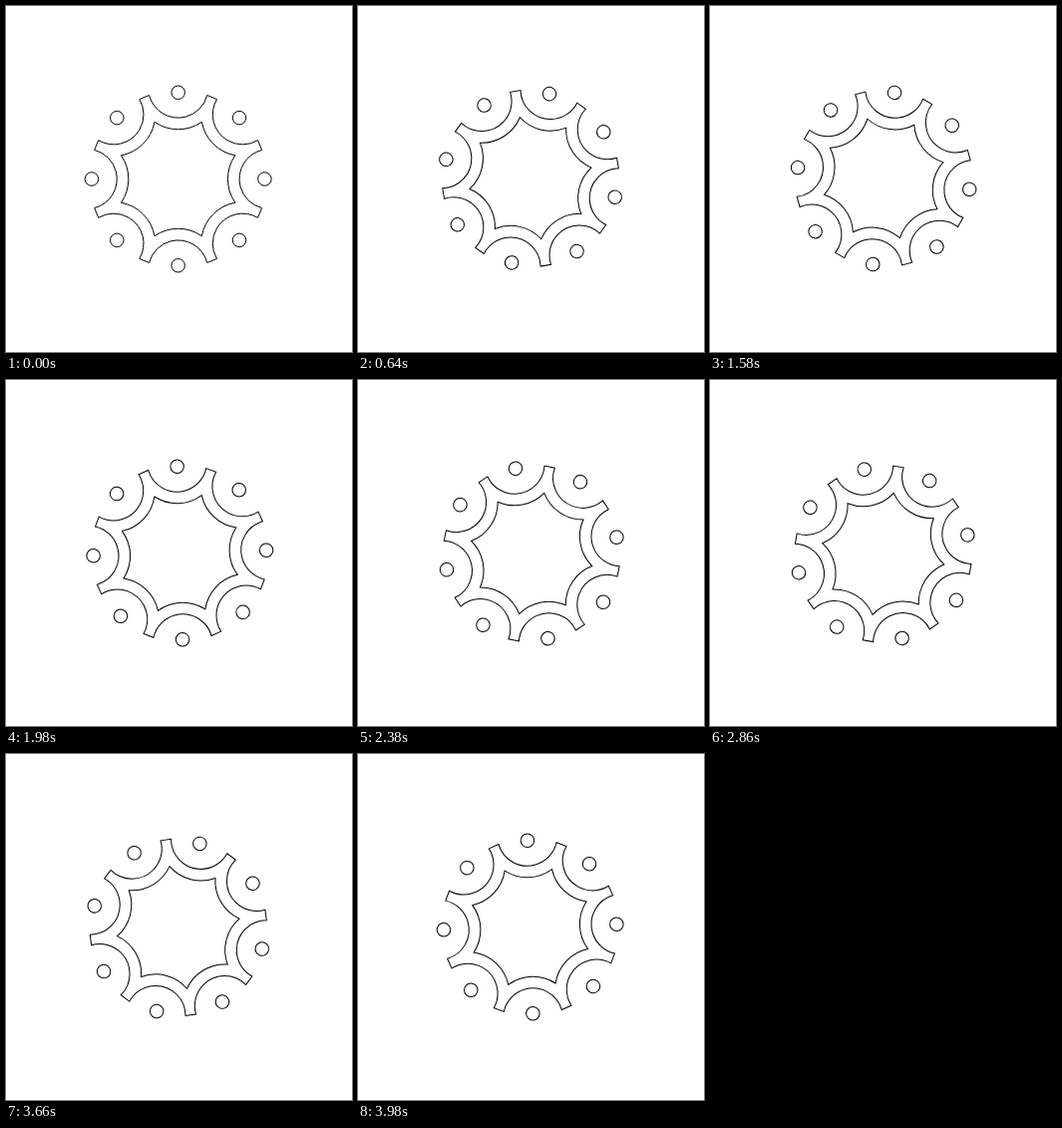
Write an HTML page with a canvas that moves like this. It is 347 px wide and 347 px high and loops after 4000 ms.

```html
<!DOCTYPE html>
<html lang="en">
<head>
<meta charset="utf-8">
<title>Turning rosette</title>
<style>
html, body { margin: 0; width: 100%; height: 100%; overflow: hidden; background: #fff; }
canvas { display: block; }
</style>
</head>
<body>
<canvas id="stage" width="347" height="347"></canvas>
<script>
const SIZE = 347, LOOP = 4000, STEP = 20, COUNT = 8;
const SECTOR = 2 * Math.PI / COUNT, HALF = SECTOR / 2;
const DRIFT = -0.85;                       // the rosette sits slightly off the pivot
const DOT_DIST = 86.75, DOT_R = 6.75;
const ARC_DIST = 91.4, INNER_R = 30, OUTER_R = 41.6, TIP_DIST = 88.7;
const ctx = document.getElementById('stage').getContext('2d');

// Half-angle of a scallop, seen from its own centre, where its edge meets
// a point on the sector border at distance d, shifted sideways by w.
function spread(d, w) {
  const x = d * Math.sin(HALF) - w * Math.cos(HALF);
  const y = ARC_DIST - d * Math.cos(HALF) - w * Math.sin(HALF);
  return Math.atan2(x, y);
}

// Distance from the rosette centre to the inner cusps.
const mid = ARC_DIST * Math.cos(HALF);
const off = ARC_DIST * Math.sin(HALF);
const cuspDist = mid - Math.sqrt(OUTER_R ** 2 - off ** 2);
// Half the width of each flat tip.
const tipHalf = off - Math.sqrt(INNER_R ** 2 - (TIP_DIST - mid) ** 2);

const cuspSpread = spread(cuspDist, 0);
const tipSpread = spread(TIP_DIST, tipHalf);

function scallops(radius, reach) {
  ctx.beginPath();
  for (let i = 0; i < COUNT; i++) {
    const a = i * SECTOR;
    const inward = a + Math.PI;
    ctx.arc(ARC_DIST * Math.cos(a), ARC_DIST * Math.sin(a), radius,
            inward + reach, inward - reach, true);
  }
  ctx.closePath();
  ctx.stroke();
}

function dots() {
  for (let i = 0; i < COUNT; i++) {
    const a = i * SECTOR;
    ctx.beginPath();
    ctx.arc(DOT_DIST * Math.cos(a), DOT_DIST * Math.sin(a), DOT_R, 0, 2 * Math.PI);
    ctx.stroke();
  }
}

function draw(time) {
  const t = Math.floor((time % LOOP) / STEP) * STEP;
  ctx.setTransform(1, 0, 0, 1, 0, 0);
  ctx.fillStyle = '#fff';
  ctx.fillRect(0, 0, SIZE, SIZE);
  ctx.translate(SIZE / 2, SIZE / 2);
  ctx.rotate(2 * Math.PI * t / LOOP);
  ctx.translate(DRIFT, 0);
  ctx.strokeStyle = '#000';
  ctx.lineWidth = 1;
  scallops(INNER_R, tipSpread);
  scallops(OUTER_R, cuspSpread);
  dots();
}

let start = null;
function tick(now) {
  if (start === null) start = now;
  draw(now - start);
  requestAnimationFrame(tick);
}
draw(0);
requestAnimationFrame(tick);
</script>
</body>
</html>
```
